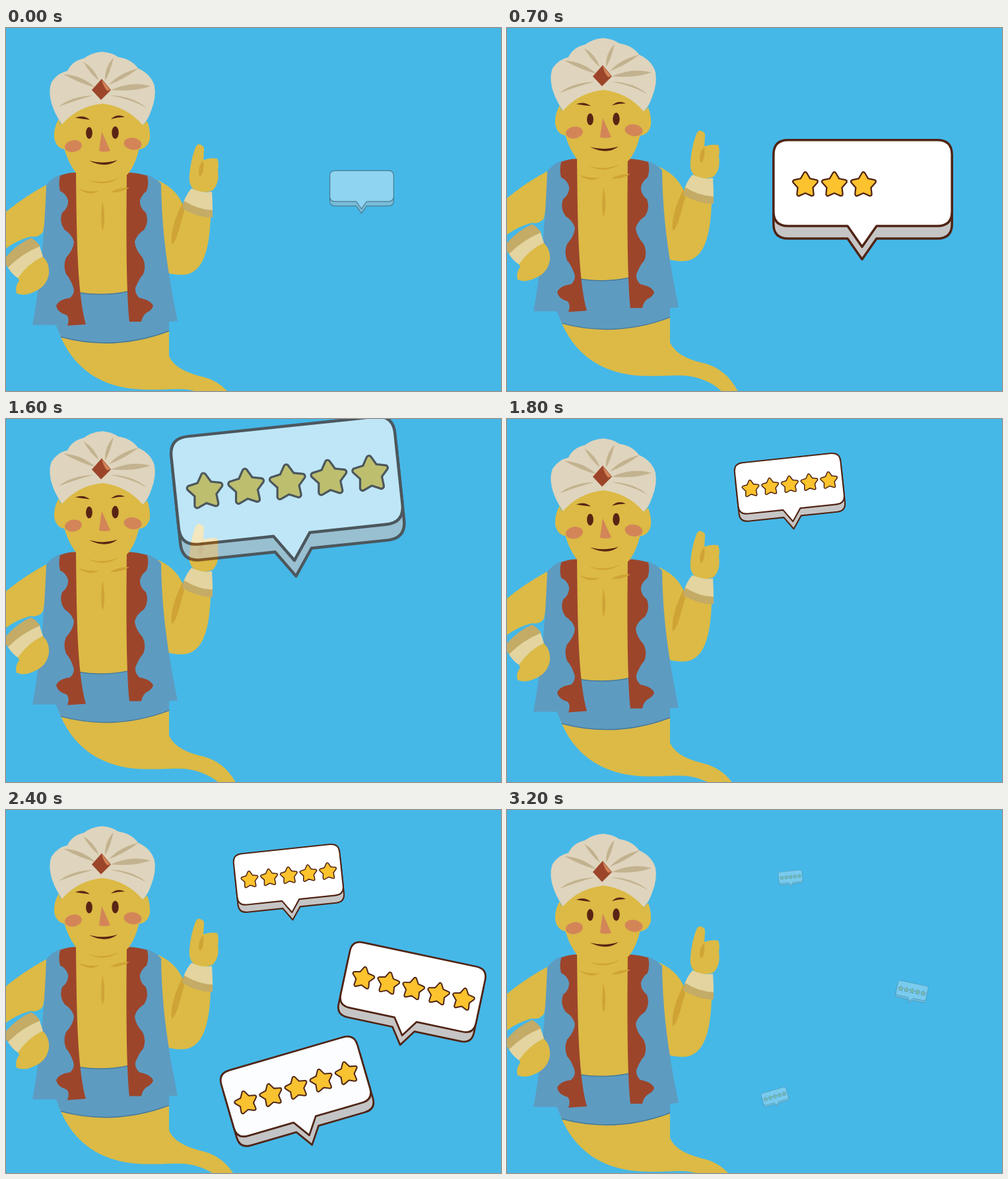
An HTML page that plays this animation: 750 by 550 pixels, repeating every 3700 ms.

```html
<!DOCTYPE html>
<html lang="en">
<head>
<meta charset="utf-8">
<title>Five star genie</title>
<style>
  html, body { margin: 0; width: 100%; height: 100%; overflow: hidden; background: #45b8e8; }
  svg { display: block; width: 750px; height: 550px; }
  .skin { fill: #dcba45; }
  .crease { fill: #cfa335; }
  .cloth { fill: #5e9bc1; }
  .trim { fill: #9c452b; }
  .wrap { fill: #dfd4bd; }
  .fold { fill: #c2b28f; }
  .cuff { fill: #e3d4a0; }
  .band { fill: #c4ab66; }
  .blush { fill: #d38558; }
  .ink { fill: #5a2414; }
  .seam { fill: none; stroke: #46799c; stroke-width: 1.5; }
  .face, .depth { stroke: #502414; stroke-width: 3.5; stroke-linejoin: round; }
  .face { fill: #fff; }
  .depth { fill: #c6c5c5; }
  .rim, .gold { stroke-linejoin: round; }
  .rim { fill: #502414; stroke: #502414; stroke-width: 7.5; }
  .gold { fill: #fdc32e; stroke: #fdc32e; stroke-width: 3; }
</style>
</head>
<body>
<svg viewBox="0 0 750 550">
  <defs>
    <path id="panel" d="M-113,-72.2H113Q135.2,-72.2 135.2,-50V36Q135.2,58 113,58H21L-1,89.5L-23,58H-113Q-135.2,58 -135.2,36V-50Q-135.2,-72.2 -113,-72.2Z"/>
    <g id="star"></g>
  </defs>

  <g id="genie">
    <!-- tail and sash -->
    <path class="skin" d="M76,445L82,466C105,520 150,548 215,548C255,548 272,544 295,553Q315,560 328,574H351C340,550 322,535 300,529C275,523 255,515 247,497V440Z"/>
    <path class="cloth" d="M74,446L83,468Q165,490 247,459V396H108Z"/>
    <path class="seam" d="M83,468Q165,490 247,459"/>

    <!-- arms -->
    <path class="skin" d="M64,236Q25,257 -3,281V336Q15,322 37,316Q50,318 56,309L66,260Z"/>
    <path class="skin" d="M230,231C252,240 266,258 269,272L310,286C308,345 295,374 266,374Q255,374 244,371L232,300Z"/>
    <path class="crease" d="M268,264C255,290 249,310 251,328C259,324 263,300 270,278Z"/>
    <path class="skin" d="M292,176Q301,178 300,184L299,200Q310,196 320,198Q323,205 321,215Q324,235 313,246Q300,252 285,245Q276,238 278,222Q280,200 286,184Q288,177 292,176Z"/>
    <path class="crease" d="M299,201C291,208 291,222 294,225C299,222 300,212 299,201Z"/>
    <path class="cuff" d="M281,243Q298,251 312,248Q313,262 313,278Q288,276 269,264Q273,252 281,243Z"/>
    <path class="band" d="M270,262Q290,275 313,276V287Q288,287 267,273Z"/>

    <!-- chest and vest -->
    <path class="skin" d="M100,219H190L187,399Q148,407 108,401Z"/>
    <path class="seam" d="M110,401Q148,407 186,399"/>
    <path class="cloth" d="M83,222Q70,226 61,238C58,320 50,400 40,450H97L108,400L104,222Z"/>
    <path class="cloth" d="M213,222Q226,227 235,236C236,310 245,370 260,444L247,445H190L185,400V222Z"/>
    <path class="trim" d="M82,224Q92,219 106,219C107,300 107,400 121,449L93,451Q97,440 92,435Q78,431 76,421Q80,411 97,409Q105,402 102,393Q97,379 91,373Q86,360 91,348Q102,336 103,324Q100,313 89,306Q80,294 85,280Q95,272 94,261Q91,251 82,247Q79,236 82,224Z"/>
    <path class="trim" d="M214,224Q199,219 183,219C182,300 182,400 187,445H205Q207,436 212,432Q222,427 223,421Q219,412 202,409Q195,402 196,394Q202,379 208,373Q213,360 207,348Q196,336 195,324Q198,313 209,306Q217,294 212,280Q202,272 203,261Q206,252 213,247Q217,236 214,224Z"/>

    <!-- hand on the hip -->
    <path class="skin" d="M55,346Q66,355 65,372Q62,392 42,400Q28,407 16,402Q13,392 20,383L18,378Q30,357 55,346Z"/>
    <path class="band" d="M-3,350Q15,328 38,318Q46,322 52,331Q25,342 4,364L-3,355Z"/>
    <path class="cuff" d="M51,331L56,346Q33,357 18,379Q9,373 3,363Q25,341 51,331Z"/>

    <!-- head -->
    <path class="skin" d="M82,130C82,170 90,200 108,222H184C200,203 207,170 207,130Q148,90 82,130Z"/>
    <path class="skin" d="M80,138Q72,151 73,166Q76,184 93,184Z"/>
    <path class="skin" d="M214,141Q219,155 218,168Q214,184 199,184L203,150Z"/>
    <path class="crease" d="M124,230Q148,237 171,227Q150,242 124,230ZM109,243Q125,249 141,247Q126,256 109,243ZM158,249Q170,241 187,242Q174,250 158,249ZM146,262Q152,285 147,307Q142,300 146,262Z"/>
    <path class="wrap" d="M85,146C70,125 62,100 69,82Q78,68 93,65Q100,50 118,46Q130,37 146,36Q160,37 170,44Q190,47 200,61Q220,70 225,88Q228,105 220,125Q215,140 207,147Q183,119 146,114.5Q108,119 85,146Z"/>
    <path class="fold" d="M80,119Q98,104 133,102Q110,108 80,119ZM87,70Q116,72 135,90Q112,84 87,70ZM117,51Q134,61 141,80Q128,70 117,51ZM163,45Q149,60 150,80Q157,70 163,45ZM201,61Q172,68 156,86Q180,77 201,61ZM219,88Q190,80 159,94Q195,97 219,88ZM213,121Q192,103 158,102Q190,108 213,121Z"/>
    <path class="trim" d="M145,77L159,94L144,109L130,94Z"/>
    <path class="blush" d="M145,78L158,94L153,95Q147,88 145,78Z"/>
    <path class="ink" d="M105,136Q117,131 127,139Q116,138 105,136ZM159,138Q169,129 180,135Q169,135 159,138ZM126,201Q148,207 169,200Q152,214 126,201Z"/>
    <ellipse class="ink" cx="126" cy="159" rx="4.9" ry="9"/>
    <ellipse class="ink" cx="165.5" cy="158.5" rx="5.2" ry="9.5"/>
    <path class="blush" d="M145,157L158,186Q148,189 141,186Z"/>
    <ellipse class="blush" cx="102" cy="179" rx="13" ry="9" transform="rotate(-10 102 179)"/>
    <ellipse class="blush" cx="192" cy="175.5" rx="13.5" ry="9" transform="rotate(8 192 175.5)"/>
  </g>
  <g id="bubbles"></g>
</svg>

<script>
const LOOP = 3700, STEP = 100, LAST = 3200;
const genie = document.getElementById('genie');
const layer = document.getElementById('bubbles');

// Value at t along a list of [time, value] points.
const smooth = p => (1 - Math.cos(Math.PI * p)) / 2;
function track(points, t, ease = p => p) {
  if (t <= points[0][0]) return points[0][1];
  for (let i = 1; i < points.length; i++) {
    const [t0, a] = points[i - 1], [t1, b] = points[i];
    if (t <= t1) return a + (b - a) * ease((t - t0) / (t1 - t0));
  }
  return points[points.length - 1][1];
}

const BOB = [[0, 0], [630, -22], [1070, 0], [1430, -21.5], [2020, 0], [2760, -22], [3100, 0]];
const POP = [[0, .358], [100, .8], [200, 1.2], [300, 1.12], [400, 1.03], [500, 1]];
const POP_FADE = [[0, .4], [150, 1]];
const STAR_POP = [[0, 0], [100, 1.2], [200, 1]];
const SHRINK = [[0, 1], [.2, 1.04], [.4, .965], [.8, .223], [1, 0]];
const SHRINK_FADE = [[.4, 1], [.8, .28], [1, 0]];

// x, y: point the bubble scales about; dx, dy: its centre from there at full size.
const bubbles = [
  { x: 539, y: 242, dx: 0, dy: 0, size: 1, turn: 0, gap: 44, out: 1200, outTime: 400 },
  { x: 430, y: 102, dx: -1.7, dy: 0, size: .597, turn: -6, gap: 50, start: 1500 },
  { x: 612.8, y: 275, dx: 2.6, dy: -1.2, size: .775, turn: 12, gap: 50, start: 1800 },
  { x: 398.3, y: 436.8, dx: 34.5, dy: -10.2, size: .65, turn: -16.2, gap: 50, start: 2200 }
];

const starPoints = Array.from({ length: 10 }, (_, i) => {
  const r = i % 2 ? 9.3 : 17, a = i * Math.PI / 5;
  return (r * Math.sin(a)).toFixed(2) + ',' + (-r * Math.cos(a)).toFixed(2);
}).join(' ');
document.getElementById('star').innerHTML =
  `<polygon class="rim" points="${starPoints}"/><polygon class="gold" points="${starPoints}"/>`;

layer.innerHTML = bubbles.map(() =>
  '<g><use href="#panel" class="depth" y="19"/><use href="#panel" class="face"/>' +
  '<use href="#star" class="s"/>'.repeat(5) + '</g>').join('');
bubbles.forEach((b, i) => {
  b.node = layer.children[i];
  b.stars = [...b.node.querySelectorAll('.s')];
});

function pose(b, t) {
  const p = (t - (b.out || 2800)) / (b.outTime || 500);
  if (p > 0) return [track(SHRINK, p), track(SHRINK_FADE, p)];
  if (b.start === undefined) return [track(POP, t), track(POP_FADE, t)];
  const q = Math.min(1, Math.max(0, (t - b.start) / 225));
  return [3 - 2 * q, 1 - (1 - q) ** 1.8];
}

function draw(t) {
  genie.setAttribute('transform', `translate(0 ${track(BOB, t, smooth).toFixed(2)})`);
  for (const b of bubbles) {
    const [k, alpha] = pose(b, t);
    b.node.setAttribute('opacity', alpha);
    b.node.setAttribute('transform',
      `translate(${b.x + b.dx * k} ${b.y + b.dy * k}) rotate(${b.turn}) scale(${b.size * k})`);
    b.stars.forEach((s, i) => {
      const pop = b.start === undefined ? track(STAR_POP, t - 100 - 200 * i) : 1;
      s.setAttribute('transform', `translate(${(i - 2) * b.gap + 1} -4) scale(${pop * b.gap / 44})`);
    });
  }
}

function tick() {
  const t = performance.now() % LOOP;
  draw(Math.min(LAST, Math.floor(t / STEP) * STEP));
  requestAnimationFrame(tick);
}
tick();
</script>
</body>
</html>
```
